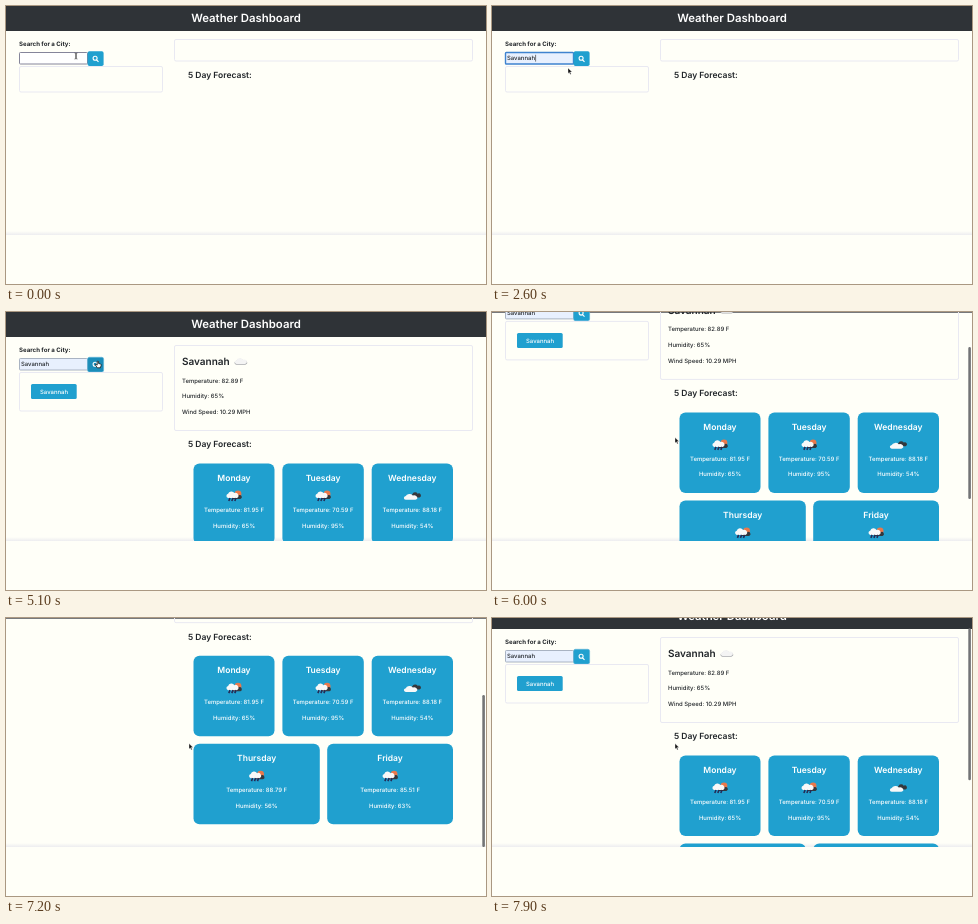
An HTML page that plays this animation: 480 by 278 pixels, repeating every 8000 ms.

```html
<!DOCTYPE html>
<html lang="en">
<head>
<meta charset="utf-8">
<title>Weather Dashboard</title>
<style>
html, body { margin: 0; width: 100%; height: 100%; overflow: hidden; background: #fffff8; }
svg { display: block; width: 480px; height: 278px; font: 500 5.95px Inter, "Open Sans", sans-serif; fill: #212529; text-rendering: geometricPrecision; }
.mid { text-anchor: middle; }
.light { fill: #fff; }
.title { font-size: 11.4px; font-weight: 600; }
.head { font-size: 8.5px; font-weight: 600; }
.box { fill: none; stroke: #e9e9f2; }
.blue { fill: #20a0cf; }
</style>
</head>
<body>
<svg viewBox="0 0 480 278">
  <defs>
    <clipPath id="view"><rect width="480" height="229"/></clipPath>
    <linearGradient id="fade" x2="0" y2="1">
      <stop stop-color="#ededf0" stop-opacity="0"/><stop offset="1" stop-color="#ededf0"/>
    </linearGradient>
    <path id="cloud" d="M-5 4a2.6 2.6 0 0 1 0-5a3.8 3.8 0 0 1 7-.8a2.9 2.9 0 0 1 2.6 5.8z"/>
    <g id="overcast">
      <use href="#cloud" fill="#a9abae" transform="translate(0 .2) scale(.95 .75)"/>
      <use href="#cloud" fill="#f4f4f4" transform="translate(0 -.5) scale(.9 .72)"/>
    </g>
    <g id="cloudy">
      <use href="#cloud" fill="#34383d" transform="translate(3.8 -1.2) scale(.75 .65)"/>
      <use href="#cloud" fill="#f8f8f8" transform="translate(-1.6 .8) scale(1 .75)"/>
    </g>
    <g id="rain">
      <circle cx="4" cy="-2" r="3.4" fill="#e9784b"/>
      <use href="#cloud" fill="#34383d" transform="translate(3 .4) scale(.75 .65)"/>
      <use href="#cloud" fill="#f8f8f8" transform="translate(-1.4 -1.4) scale(.9 .85)"/>
      <path d="M-4 2l-1.2 3M-1 2l-1.2 3M2 2l-1.2 3" stroke="#252a55" stroke-width="1.6"/>
    </g>
  </defs>
  <g clip-path="url(#view)">
    <rect y="225" width="480" height="4" fill="url(#fade)"/>
    <path d="M0 .5H480" stroke="#77797c"/>
    <g id="page">
      <rect width="480" height="25" fill="#2f3337"/>
      <text class="title mid light" x="240" y="16.4">Weather Dashboard</text>
      <text x="13" y="40" font-size="6.1" font-weight="700">Search for a City:</text>
      <rect id="input" x="13.5" y="46.5" width="68" height="11.5" rx=".8"/>
      <text id="typed" x="15" y="54.3"></text>
      <path id="caret" d="M43.6 48.8v6.8" stroke="#222" stroke-width=".6"/>
      <rect id="button" x="81.6" y="45.3" width="16" height="14.7" rx="1.8" class="blue"/>
      <path d="M90.7 54l1.8 1.8M91.1 52.2a2 2 0 1 1-4 0a2 2 0 1 1 4 0" fill="none" stroke="#fff" stroke-width="1.1"/>
      <rect id="history" class="box" x="13.5" y="60.5" width="143" rx="1.5"/>
      <rect id="result" class="box" x="168.5" y="33.5" width="298" rx="1.5"/>
      <text id="forecast" class="head" x="182">5 Day Forecast:</text>
      <g id="data">
        <rect class="blue" x="25" y="72" width="45.7" height="15" rx="1.5"/>
        <text class="mid light" x="48" y="81.7">Savannah</text>
        <text x="176" y="53.4" font-size="10" font-weight="600">Savannah</text>
        <use href="#overcast" x="235" y="49.5"/>
        <text x="176" y="70.5">Temperature: 82.89 F</text>
        <text x="176" y="86">Humidity: 65%</text>
        <text x="176" y="101.7">Wind Speed: 10.29 MPH</text>
        <g id="cards"></g>
      </g>
      <g id="menu"></g>
    </g>
    <rect id="bar" x="476.3" width="2.6" height="152" rx="1.3" fill="#737476"/>
    <g id="cursor">
      <path id="beam" d="M-1.4 -3q1.4 0 1.4 1v4q0 1-1.4 1M1.4 -3q-1.4 0-1.4 1v4q0 1 1.4 1" fill="none" stroke="#333" stroke-width=".7"/>
      <path id="arrow" d="M0 0v5.6l1.3-1.2l.9 2l1-.5l-.9-1.9h1.8z" fill="#111" stroke="#fff" stroke-width=".4"/>
      <path id="hand" d="M-.8 -2.5q.8-.8 1.4 0v2l2 .5q.8.4.5 1.6l-.7 2.2h-3l-2-2.8q0-.8 1-.5l.8.6z" fill="#fff" stroke="#111" stroke-width=".8"/>
    </g>
  </g>
</svg>
<script>
const $ = id => document.getElementById(id);
const set = (id, attrs) => { for (const k in attrs) $(id).setAttribute(k, attrs[k]); };
const show = (id, on) => $(id).style.display = on ? '' : 'none';

const card = (x, y, w, day, temp, humidity, icon) => {
  const mid = x + w / 2;
  return `<rect class="blue" x="${x}" y="${y}" width="${w}" height="80.4" rx="6"/>
    <text class="head mid light" x="${mid}" y="${y + 17.2}">${day}</text>
    <use href="#${icon}" x="${mid}" y="${y + 32.4}"/>
    <text class="mid light" x="${mid}" y="${y + 48.4}">Temperature: ${temp} F</text>
    <text class="mid light" x="${mid}" y="${y + 63.9}">Humidity: ${humidity}%</text>`;
};
$('cards').innerHTML = [
  [187.5, 151.6, 81, 'Monday', '81.95', 65, 'rain'],
  [276.4, 151.6, 81.4, 'Tuesday', '70.59', 95, 'rain'],
  [365.7, 151.6, 81.3, 'Wednesday', '88.18', 54, 'cloudy'],
  [187.5, 239.6, 126.3, 'Thursday', '88.79', 56, 'rain'],
  [321.2, 239.6, 125.8, 'Friday', '85.51', 63, 'rain']
].map(c => card(...c)).join('');

const menu = names => `<rect x="13" y="59.5" width="76" height="${names.length * 18 + 2}" rx="1.5" fill="#fff" stroke="#d5d6da" stroke-width=".6"/>` +
  names.map((name, i) => `<text x="16" y="${71 + i * 18}">${name}</text>`).join('');
const fullMenu = menu(['Savannah', 'Atlanta', 'Austin', 'Denver']);
const shortMenu = menu(['Savannah']);

// Rows are [time, value...], joined by straight lines.
const scrollKeys = [[5450, 0], [5700, 20], [6000, 51], [6400, 91], [6700, 107], [7000, 114], [7200, 114], [7900, 14]];
const cursorKeys = [[1500, 70, 50], [1900, 76, 62], [2700, 76, 62], [3300, 92, 52], [5150, 92, 52], [5400, 183, 125.5]];
const track = (keys, t) => {
  const i = keys.findIndex(k => k[0] > t);
  if (i === 0) return keys[0].slice(1);
  if (i < 0) return keys.at(-1).slice(1);
  const a = keys[i - 1], b = keys[i], p = (t - a[0]) / (b[0] - a[0]);
  return a.slice(1).map((v, j) => v + (b[j + 1] - v) * p);
};

function draw() {
  const t = performance.now() % 8000;
  const [scroll] = track(scrollKeys, t);
  const [x, y] = track(cursorKeys, t);
  const filled = t >= 2300, loaded = t >= 3600;
  const focused = t >= 100 && t < 3500;
  const hover = t >= 3150 && t < 5200;

  set('page', { transform: `translate(0 ${-scroll})` });
  set('input', {
    fill: filled ? '#e8f0fe' : '#fff',
    stroke: focused ? '#3f83cf' : filled ? '#a9b3c2' : '#85859a',
    'stroke-width': focused ? 1.4 : 1
  });
  $('typed').textContent = filled ? 'Savannah' : t >= 1300 ? 'S' : '';
  show('caret', filled && focused);
  set('button', {
    style: hover ? 'fill:#1b8db9' : '',
    stroke: loaded ? '#5fb4d8' : 'none',
    'stroke-width': .7
  });
  set('history', { height: loaded ? 38.5 : 25.5 });
  set('result', { height: loaded ? 85 : 21.5 });
  set('forecast', { y: loaded ? 135.4 : 72.4 });
  show('data', loaded);

  const list = t >= 100 && t < 1100 ? fullMenu : t >= 1700 && t < 2300 ? shortMenu : '';
  if ($('menu').dataset.list !== list) $('menu').innerHTML = $('menu').dataset.list = list;

  set('bar', { y: 1 + scroll * 229 / 343 });
  show('bar', t >= 5450);
  set('cursor', { transform: `translate(${x} ${y})` });
  show('beam', t < 1650);
  show('hand', hover);
  show('arrow', t >= 1650 && !hover);
  requestAnimationFrame(draw);
}
draw();
</script>
</body>
</html>
```
